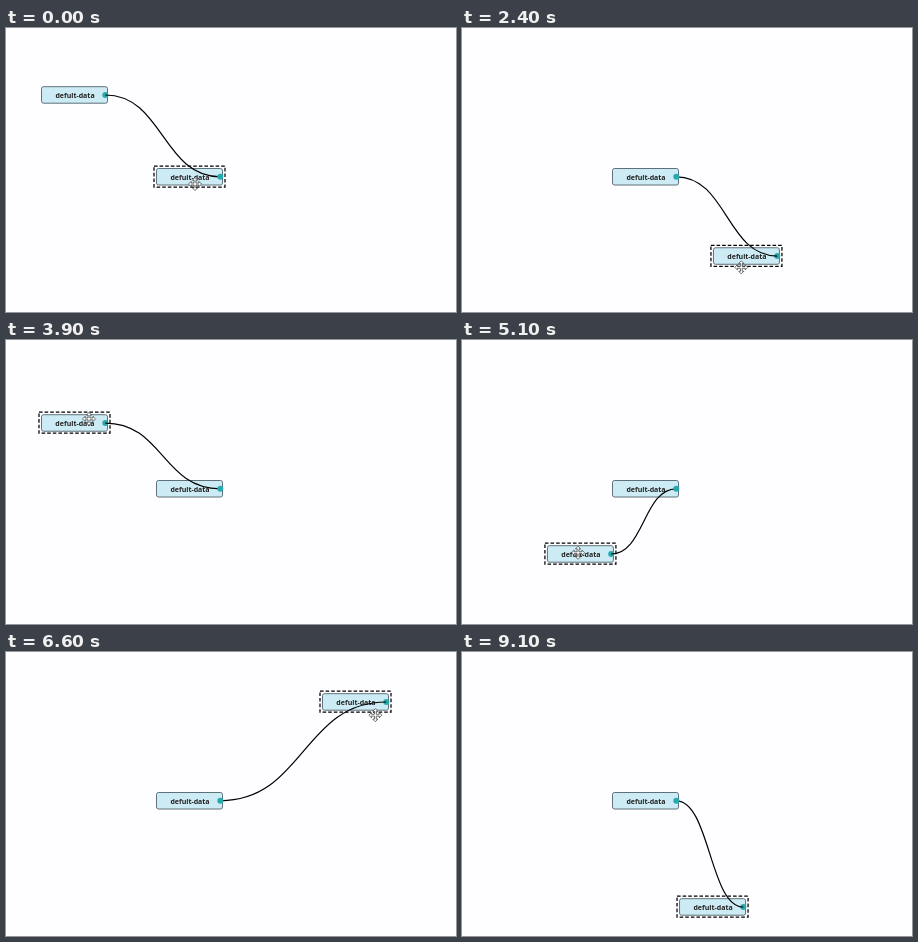
Write an HTML page that moves like this. It is 450 by 284 pixels and loops after 9.7 s.

```html
<!DOCTYPE html>
<html lang="en">
<head>
<meta charset="utf-8">
<title>Connected nodes</title>
<style>
  html, body { margin: 0; width: 100%; height: 100%; overflow: hidden; background: #fefdff; }
  svg { display: block; width: 100vw; height: 100vh; }
  text { font: 600 7px "Noto Sans", "Open Sans", sans-serif; text-anchor: middle; fill: #222; }
  .box { fill: #cdebf4; stroke: #4f626e; stroke-width: .9; }
  .port { fill: #27aaad; }
  .link { fill: none; stroke: #000; stroke-width: 1.2; }
  .selection { fill: none; stroke: #000; stroke-width: 1.25; stroke-dasharray: 3.6 2; }
  .cursor path { fill: #fff; stroke: #333; stroke-width: .7; }
</style>
</head>
<body>
<svg viewBox="0 0 450 284">
  <defs>
    <g id="node">
      <rect class="box" x=".5" y=".5" width="66" height="16.5" rx="2"/>
      <text x="34" y="11.8">defult-data</text>
    </g>
    <circle id="port" class="port" cx="64.3" cy="8.8" r="3"/>
  </defs>
  <use id="fixedNode" href="#node"/>
  <use id="dragNode" href="#node"/>
  <use id="dragPort" href="#port"/>
  <path id="link" class="link"/>
  <use id="fixedPort" href="#port"/>
  <rect id="selection" class="selection" x="-2" y="-2" width="71" height="21"/>
  <g id="cursor" class="cursor">
    <path id="moveIcon" d="M0-6.5 2.6-3.9H.9V-.9H3.9V-2.6L6.5 0 3.9 2.6V.9H.9V3.9H2.6L0 6.5-2.6 3.9H-.9V.9H-3.9V2.6L-6.5 0-3.9-2.6V-.9H-.9V-3.9H-2.6Z"/>
    <path id="arrowIcon" d="M0 0V10.5L2.5 8.2 4.2 12 5.8 11.3 4.2 7.6H7.5Z"/>
  </g>
</svg>
<script>
const LOOP = 9700, STEP = 100;
const DRAG_START = 1000, DRAG_END = 8000, CURSOR_GONE = 8600;
const FIXED = [150, 140], PORT = [64.3, 8.8], GRAB = [41, 12];
const CURSOR_IN = [189, 156], CURSOR_OUT = [413, 278];
const LEAD = 35; // the pointer runs this many ms ahead of the dragged node
const $ = id => document.getElementById(id);

// The node circles on an ellipse: [time, degrees clockwise, relative radius].
const CENTRE = [144, 140.2], RADII = [142, 105];
const orbit = [
  [1000, -134.5, 1.095], [1900, -44, .92], [2400, 45, 1.065], [2900, 133, .92],
  [3900, 219.3, .992], [4500, 355, 1.56], [4900, 408, .716], [5100, 483.9, .746],
  [5900, 580, 1.06], [6600, 682.1, 1.535], [6900, 720, 1.63], [7600, 779.1, 1.166],
  [8000, 783, 1.133]
];

// Cubic interpolation that never overshoots its keys.
function sample(keys, t) {
  const last = keys.length - 1;
  if (t <= keys[0][0]) return keys[0].slice(1);
  if (t >= keys[last][0]) return keys[last].slice(1);
  const i = keys.findIndex(key => key[0] > t) - 1;
  const span = keys[i + 1][0] - keys[i][0];
  const u = (t - keys[i][0]) / span;
  return [1, 2].map(column => {
    const slope = k => (keys[k + 1][column] - keys[k][column]) / (keys[k + 1][0] - keys[k][0]);
    const tangent = k => {
      if (k === 0 || k === last) return 0;
      const a = slope(k - 1), b = slope(k);
      return a * b > 0 ? 2 * a * b / (a + b) : 0;
    };
    const from = keys[i][column], to = keys[i + 1][column];
    return from + (to - from) * u * u * (3 - 2 * u)
      + span * u * (1 - u) * (tangent(i) * (1 - u) - tangent(i + 1) * u);
  });
}

const add = (a, b) => [a[0] + b[0], a[1] + b[1]];
const place = (id, [x, y]) => $(id).setAttribute("transform", `translate(${x} ${y})`);
const show = (id, visible) => $(id).setAttribute("visibility", visible ? "visible" : "hidden");
const inside = ([x, y], [nx, ny]) => x >= nx && x <= nx + 67 && y >= ny && y <= ny + 17;

function tween(from, to, t, begin, end) {
  const u = Math.min(1, Math.max(0, (t - begin) / (end - begin)));
  const eased = u * u * (3 - 2 * u);
  return from.map((value, axis) => value + (to[axis] - value) * eased);
}

function nodeAt(t) {
  const [degrees, radius] = sample(orbit, t);
  const angle = degrees * Math.PI / 180;
  return add(CENTRE, [RADII[0] * radius * Math.cos(angle), RADII[1] * radius * Math.sin(angle)]);
}

function cursorAt(t) {
  const held = add(nodeAt(t + LEAD), GRAB);
  if (t < DRAG_START) return tween(CURSOR_IN, add(nodeAt(0), GRAB), t, 0, 800);
  return t <= DRAG_END ? held : tween(held, CURSOR_OUT, t, 8200, 8500);
}

function draw(time) {
  const t = Math.floor(time / STEP) * STEP;
  const node = nodeAt(t), cursor = cursorAt(t);
  const dragging = t >= DRAG_START && t <= DRAG_END;
  const moving = dragging || inside(cursor, node) || inside(cursor, FIXED);

  place("dragNode", node);
  place("dragPort", node);
  place("selection", t < DRAG_START ? FIXED : node);
  place("cursor", cursor);
  show("moveIcon", moving && t < CURSOR_GONE);
  show("arrowIcon", !moving && t < CURSOR_GONE);

  const [x1, y1] = add(node, PORT), [x2, y2] = add(FIXED, PORT);
  const mid = (x1 + x2) / 2;
  $("link").setAttribute("d", `M${x1} ${y1}C${mid} ${y1} ${mid} ${y2} ${x2} ${y2}`);
}

place("fixedNode", FIXED);
place("fixedPort", FIXED);
const start = performance.now();
function tick() {
  draw((performance.now() - start) % LOOP);
  requestAnimationFrame(tick);
}
tick();
</script>
</body>
</html>
```
